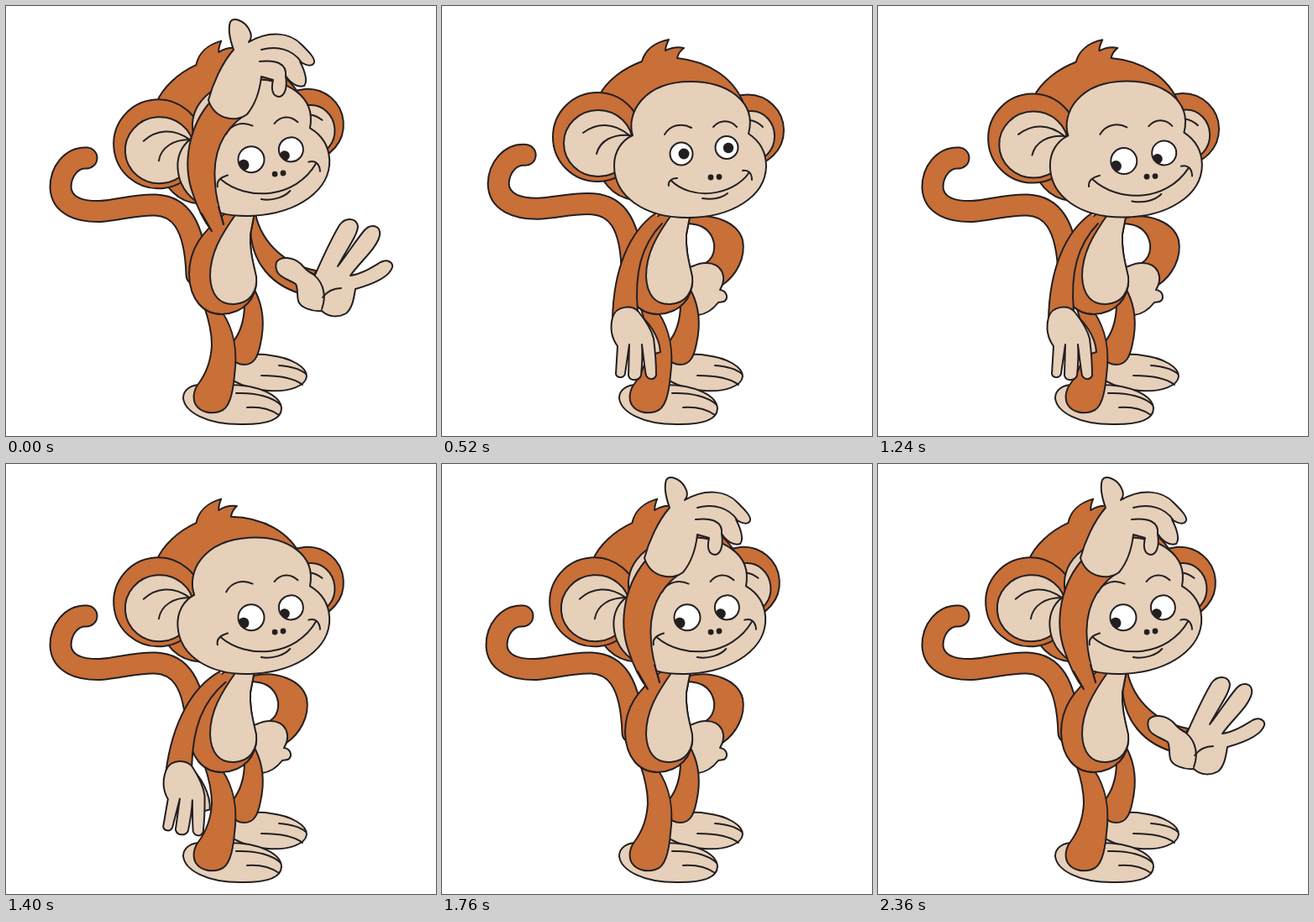
These frames come from a looping animation (512 by 512 pixels, 2.88 s). An HTML page with a canvas:

```html
<!DOCTYPE html>
<html lang="en">
<head>
<meta charset="utf-8">
<title>Monkey</title>
<style>
html, body { margin: 0; width: 100%; height: 100%; overflow: hidden; background: #fff; }
canvas { display: block; width: 100vw; height: 100vh; }
</style>
</head>
<body>
<canvas id="stage" width="512" height="512"></canvas>
<script>
const ctx = document.getElementById('stage').getContext('2d');
const LOOP = 2880, STEP = 40;
const FUR = '#c96f38', SKIN = '#e6d0ba', INK = '#231f20';

const paths = {};
const path = d => paths[d] || (paths[d] = new Path2D(d));

function line(d, width = 2) {
  ctx.lineWidth = width;
  ctx.strokeStyle = INK;
  ctx.stroke(path(d));
}

function shape(d, fill) {
  ctx.fillStyle = fill;
  ctx.fill(path(d));
  line(d);
}

function oval(x, y, rx, ry, fill, outlined = true) {
  ctx.beginPath();
  ctx.ellipse(x, y, rx, ry, 0, 0, Math.PI * 2);
  ctx.fillStyle = fill;
  ctx.fill();
  if (!outlined) return;
  ctx.lineWidth = 2;
  ctx.strokeStyle = INK;
  ctx.stroke();
}

// Draw with a rotation and scale about (x, y), then a shift.
function posed({ x, y, turn = 0, scale = 1, dx = 0, dy = 0 }, draw) {
  ctx.save();
  ctx.translate(x + dx, y + dy);
  ctx.rotate(turn);
  ctx.scale(scale, scale);
  ctx.translate(-x, -y);
  draw();
  ctx.restore();
}

// Number of steps taken since a move began, from 0 to count.
const steps = (t, from, count) =>
  Math.max(0, Math.min(count, Math.floor((t - from) / STEP) + 1));

function tail() {
  const d = 'M96 181C78 180 65 197 65 216C66 238 88 245 112 244.5C135 243 155 236 178 237C204 238 225 256 227 320';
  line(d, 27);
  ctx.lineWidth = 23;
  ctx.strokeStyle = FUR;
  ctx.stroke(path(d));
}

function feetAndLegs() {
  shape('M272 424C282 416 298 413 315 416C340 419 358 430 358 441C357 452 338 460 312 458C297 457 283 453 270 446Z', SKIN);
  line('M325 428C338 429 350 432 357 438');
  line('M304 440C325 440 343 443 353 451');
  shape('M297 340C307 360 308 380 303 402C300 418 295 427 284 427C276 427 271 423 268 418L270 400C278 391 284 375 284 355', FUR);
  shape('M232 451C220 451 211 457 211 467C213 483 238 499 283 498C306 498 328 494 328 479C327 464 302 451 265 451Z', SKIN);
  line('M274 461C298 460 318 466 327 475');
  line('M287 478C302 477 315 480 325 487');
  shape('M236 358C243 378 245 390 245 404C244 424 238 438 229 450C223 458 222 468 226 475C232 484 244 486 254 483C266 480 270 462 272 440C276 410 272 386 257 364', FUR);
}

function body() {
  shape('M262 246C232 270 218 290 218 320C219 350 235 367 257 367C283 366 299 348 298 325C294 306 290 290 291 272L296 246', FUR);
  shape('M275 246C255 274 243 295 243 322C244 344 254 356 272 355C290 354 300 340 298 322C294 304 290 290 291 272L296 246', SKIN);
}

function hipArm() {
  shape('M295 252C322 246 352 257 358 279C362 300 350 321 334 332L310 308C325 302 327 286 321 274C315 263 306 260 292 259', FUR);
  shape('M284 313L298 310C312 303 332 304 335 322C336 330 333 334 331 338C339 339 341 347 337 351C335 353 332 352 329 353C322 362 313 367 305 368C299 369 293 367 292 360L291 350C281 346 277 335 280 324Z', SKIN);
}

function openArm() {
  shape('M297 248C305 283 333 308 369 315L360 345C315 335 291 304 291 262', FUR);
  shape('M322 305C327 297 342 299 351 307C356 313 361 318 368 320C376 302 388 276 397 261C404 251 417 252 419 262C419 272 407 288 395 310C406 296 416 280 426 268C434 258 447 261 445 273C442 288 422 304 410 321C424 319 436 311 446 305C454 301 461 305 460 311C456 324 434 332 416 337C414 350 412 360 405 366C396 371 384 371 376 363C364 364 350 359 348 351C346 343 348 337 345 331C337 326 328 324 324 318C321 314 321 309 322 305Z', SKIN);
  line('M362 317C376 325 383 342 376 361');
  line('M377 347C383 339 390 336 399 336');
}

function sideArm() {
  shape('M254 247C224 268 204 312 203 374L233 364C229 318 237 285 262 259', FUR);
  shape('M228 362C246 374 259 394 260 412L254 414L238 398', SKIN);
  shape('M203 371C207 357 226 355 234 364C242 374 249 384 252 396C254 412 255 425 255 440C252 446 246 445 243 440C241 430 240 418 238 403C239 416 238 430 237 440C234 447 224 447 222 440L223 403C221 418 219 430 218 438C216 444 208 443 207 438L209 405C201 394 200 383 203 371Z', SKIN);
}

function raisedArm() {
  shape('M252 255C215 246 185 225 171 182L137 190C158 238 195 273 251 270', FUR);
  shape('M112 149C102 139 88 136 86 125C88 113 102 113 112 124C116 100 129 84 148 78C162 74 172 78 170 86C167 91 158 91 150 93C165 91 181 95 182 103C181 110 173 111 164 110C169 118 178 123 178 129C176 136 166 135 158 127L150 133C155 146 167 154 172 170C174 184 162 195 149 194C131 192 119 176 115 153Z', SKIN);
  line('M127 120C131 102 143 94 164 92');
  line('M136 124C141 112 150 108 166 110');
  line('M112 124C110 132 111 141 112 149');
}

function headArm(hand) {
  shape('M246 111C217 142 210 188 222 222C228 241 235 255 245 268L259 260C255 246 250 230 249 212C246 180 255 150 284 130', FUR);
  ctx.fillStyle = FUR;
  ctx.fill(path('M238 245L252 235L259 262L245 270Z'));
  line('M233 247L245 268');
  line('M253 239L259 260');
  posed(hand, () => {
    shape('M241 112C246 93 257 68 271 52C267 41 264 28 267 19C271 13 283 17 289 27C293 34 293 39 289 43C313 29 338 31 352 46C361 55 368 62 367 67C365 73 357 71 350 66C355 76 360 89 355 95C347 98 338 91 333 83C335 95 333 106 326 108C318 108 315 101 318 88L304 84C302 103 296 118 287 129C276 138 249 137 241 112Z', SKIN);
    line('M304 52C324 47 341 52 351 66');
    line('M302 66C321 64 335 68 333 84');
  });
}

function eye(x, y, r, px, py, pr, open) {
  ctx.save();
  ctx.translate(0, y * (1 - open));
  ctx.scale(1, open);
  oval(x, y, r, r, '#fff', false);
  ctx.save();
  ctx.clip();
  oval(px, py, pr, pr, INK, false);
  ctx.restore();
  ctx.restore();
  ctx.beginPath();
  ctx.ellipse(x, y, r, r * open, 0, 0, Math.PI * 2);
  ctx.lineWidth = 2;
  ctx.strokeStyle = INK;
  ctx.stroke();
}

function features(aside, open) {
  posed({ x: 0, y: 0, dy: (1 - open) * 3 }, () => {
    line('M265 153C272 141 286 139 297 145');
    line('M323 144C331 135 343 135 351 144');
  });
  oval(320, 204, 3.4, 3.4, INK, false);
  oval(330, 203.5, 3.4, 3.4, INK, false);
  if (aside) {
    eye(293, 185, 15.5, 283.5, 191, 6.6, 1);
    eye(341, 176, 14.5, 333, 183, 6, 1);
    line('M255 206C285 235 343 235 370 194');
    line('M251 215C250 208 255 204 264 202');
    line('M361 192C369 190 374 195 374 204');
    line('M302 233C316 236 330 232 337 225');
  } else {
    eye(285, 176, 13.5, 288, 176, 6.5, open);
    eye(339, 168.5, 13.5, 341, 169, 6.2, open);
    line('M273 208C296 231 345 228 366 198');
    line('M270 214C269 209 273 205 280 205');
    line('M358 196C365 195 369 199 369 207');
    line('M310 229C321 231 333 229 340 223');
  }
}

function skull() {
  oval(364, 148, 43, 42.5, FUR);
  oval(368, 155, 28, 30, SKIN);
  line('M367 136C373 137 378 140 382 144');
  shape('M238 66C216 74 196 89 187 107C172 150 176 224 228 231L350 190L360 118C348 86 318 66 280 62C281 57 284 53 288 50C280 48 272 50 266 53C266 48 268 44 270 40C254 43 242 52 238 66Z', FUR);
  oval(185, 156, 53, 53, FUR);
  oval(186, 163.5, 41, 39.5, SKIN);
  line('M168 151C184 139 204 138 223 154');
  line('M184 176C188 160 204 152 224 154');
}

function face(aside, open) {
  shape('M227 154C219 128 240 90 296 90C340 90 375 114 365 152C380 162 386 176 386 191C385 227 345 252 292 252C240 252 205 226 205 190C205 173 214 160 227 154Z', SKIN);
  features(aside, open);
}

// The face leans a little less than the skull behind it.
function head(tilt, aside, open) {
  const neck = { x: 290, y: 250 };
  posed({ ...neck, turn: -0.084 * tilt, dx: 3.7 * tilt, dy: -0.8 * tilt }, skull);
  posed({ ...neck, turn: -0.06 * tilt, dx: 2.9 * tilt, dy: -2.2 * tilt },
    () => face(aside, open));
}

// Arm k steps into its swing from the side up to the head.
function swingArm(k, rub) {
  const rate = 0.414;
  if (k <= 8) {
    const turn = k <= 5 ? Math.max(0, k - 4) * 0.11 : 0.11 + (k - 5) * rate;
    posed({ x: 255, y: 255, turn }, sideArm);
  } else if (k <= 12) {
    const turn = (k - 10) * (k < 10 ? rate : 0.25);
    posed({ x: 250, y: 262, turn }, raisedArm);
  } else {
    const hand = { x: 270, y: 125, turn: 0.07 * rub, dx: 3 * rub, dy: 3.5 * rub };
    posed({ x: 252, y: 264, turn: (k - 14) * 0.22 }, () => headArm(hand));
  }
}

// Other arm k steps into its move from the hip outwards.
function reachArm(k) {
  const pose = { x: 295, y: 253 };
  if (k <= 5) {
    const turn = -k * 0.083;
    posed({ ...pose, turn, dy: -k * 0.6 }, hipArm);
  } else {
    const left = (11 - k) / 5;
    posed({ ...pose, turn: left * 0.1, scale: 1 - left * 0.15 }, openArm);
  }
}

function draw(t) {
  const ended = t < STEP;
  const wag = steps(t, 240, 12);
  const swing = ended ? 14 : steps(t, 1240, 14);
  const reach = ended ? 11 : steps(t, 1960, 11);
  const tilt = Math.min(1, swing / 5);
  const open = 1 - 0.9 * Math.max(0, 1 - Math.abs(wag - 4) / 2);
  const rub = Math.sin(Math.PI * reach / 11) / Math.sin(Math.PI * 3 / 11);

  ctx.fillStyle = '#fff';
  ctx.fillRect(0, 0, 512, 512);
  ctx.lineCap = ctx.lineJoin = 'round';

  posed({ x: 225, y: 290, turn: 0.033 * Math.sin(Math.PI * wag / 12) }, tail);
  reachArm(reach);
  feetAndLegs();
  body();
  if (swing <= 8) swingArm(swing, rub);
  head(tilt, ended || t >= 880, open);
  if (swing > 8) swingArm(swing, rub);
}

const start = performance.now();
function tick() {
  draw((performance.now() - start) % LOOP);
  requestAnimationFrame(tick);
}
tick();
</script>
</body>
</html>
```
